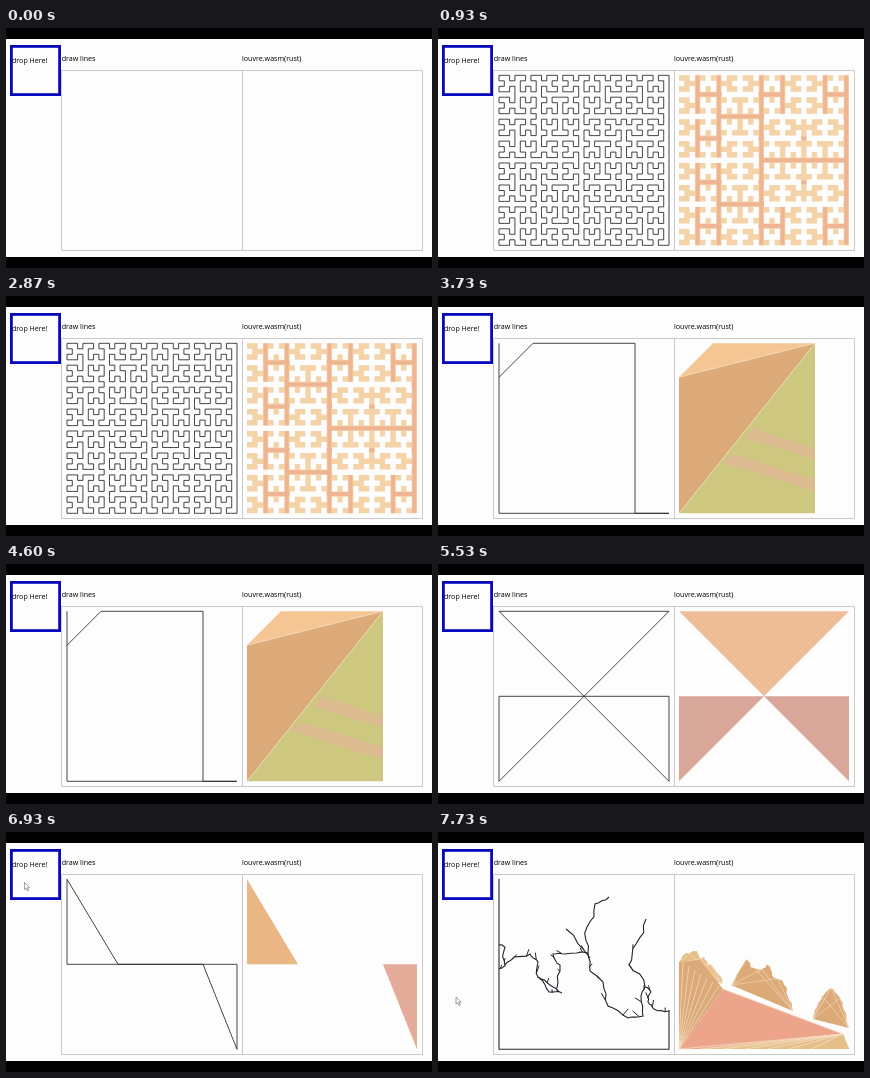
Animation, 426 px wide and 240 px high, one loop 7790 ms. Source, as an HTML page:

```html
<!DOCTYPE html>
<html lang="en">
<head>
<meta charset="utf-8">
<title>Polygon triangulation</title>
<style>
  html, body { margin: 0; width: 100%; height: 100%; overflow: hidden; background: #000; }
  svg { display: block; width: 100vw; height: 100vh; }
  text { font: 7.1px "Open Sans", "Noto Sans", sans-serif; fill: #000; }
</style>
</head>
<body>
<svg viewBox="0 0 426 240">
  <rect y="11" width="426" height="218" fill="#fdfdfd"/>
  <path d="M55.5 42.5H416.5V222.5H55.5ZM236.5 42.5V222.5" fill="none" stroke="#bdbdbb" stroke-width=".8"/>
  <rect x="5.4" y="18.4" width="48.2" height="48.2" fill="none" stroke="#0808bd" stroke-width="2.8"/>
  <text x="6" y="35">drop Here!</text>
  <text x="55.7" y="33">draw lines</text>
  <text x="236" y="33">louvre.wasm(rust)</text>
  <g id="scenes"></g>
  <path id="cursor" d="M0 0V7.2L1.7 5.7L2.9 8.4L4.1 7.9L2.9 5.3H5.1Z" fill="#fff" stroke="#777" stroke-width=".7"/>
</svg>
<script>
const LOOP = 7790;
const NS = "http://www.w3.org/2000/svg";
const LEFT = 61, RIGHT = 241, TOP = 47.3, SIZE = 170;
const SAND = "#e5bf88", SALMON = "#eca48a", TAN = "#dca978", PALE = "#f7dfc4";
const root = document.getElementById("scenes");
const cursor = document.getElementById("cursor");

function add(parent, tag, attrs) {
  const node = document.createElementNS(NS, tag);
  for (const key in attrs) node.setAttribute(key, attrs[key]);
  return parent.appendChild(node);
}

const parse = s => s.split(" ").map(p => p.split(",").map(Number));
const place = (points, left) => points.map(([x, y]) => [left + x * SIZE, TOP + y * SIZE]);
const unit = s => place(parse(s), RIGHT);
const join = points => points.map(p => p.map(v => v.toFixed(1)).join(",")).join(" ");

function line(g, points, stroke = "#24242c", width = .85) {
  return add(g, "polyline", { points: join(points), fill: "none", stroke, "stroke-width": width });
}

function fill(g, points, color) {
  return add(g, "polygon", { points: join(points), fill: color });
}

let seed = 7;
const random = () => (seed = (seed * 16807) % 2147483647) / 2147483647;

// Midpoint displacement turns a coarse line into a coast
function roughen(points, depth = 2) {
  if (!depth) return points;
  const out = [points[0]];
  for (let i = 1; i < points.length; i++) {
    const [ax, ay] = points[i - 1], [bx, by] = points[i];
    const k = (random() - .5) * .3;
    out.push([(ax + bx) / 2 - (by - ay) * k, (ay + by) / 2 + (bx - ax) * k], [bx, by]);
  }
  return roughen(out, depth - 1);
}

// Space-filling curve in grid steps, opening to the right
function hilbert(n) {
  return Array.from({ length: n * n }, (_, d) => {
    let x = 0, y = 0;
    for (let s = 1; s < n; s *= 2, d = Math.floor(d / 4)) {
      const rx = 1 & (d >> 1), ry = 1 & (d ^ rx);
      if (!ry) {
        if (rx) [x, y] = [s - 1 - x, s - 1 - y];
        [x, y] = [y, x];
      }
      x += s * rx;
      y += s * ry;
    }
    return [n - 1 - y, x];
  });
}

// Corridors of a curve cell that opens towards (dx, dy)
function corridors(cx, cy, half, dx, dy, depth) {
  if (!depth) return [];
  const bar = [[cx - dy * half, cy - dx * half], [cx + dy * half, cy + dx * half]];
  const exit = [[cx, cy], [cx + dx * half, cy + dy * half]];
  const out = [bar, exit], q = half / 2;
  for (const side of [-1, 1]) {
    const sx = dy * side, sy = dx * side;
    out.push(
      ...corridors(cx + (sx - dx) * q, cy + (sy - dy) * q, q, dx, dy, depth - 1),
      ...corridors(cx + (sx + dx) * q, cy + (sy + dy) * q, q, sx, sy, depth - 1));
  }
  return out;
}

function drawHilbert(g) {
  const n = 32, mid = (n - 1) / 2;
  const scale = points => points.map(([x, y]) => [x / n, y / (n - 1)]);
  const loop = [...hilbert(n), [n, n - 1], [n, 0], [n - 1, 0]];
  line(g, place(scale(loop), LEFT));

  const area = place(scale(loop), RIGHT);
  fill(g, area, "#f4d3a8");
  add(add(g, "clipPath", { id: "curve" }), "polygon", { points: join(area) });
  const inside = add(g, "g", { "clip-path": "url(#curve)" });
  const edge = [[n - .5, 0], [n - .5, n - 1]];
  for (const path of [edge, ...corridors(mid, mid, n / 2, 1, 0, 3)])
    line(inside, place(scale(path), RIGHT), "#efb593", 4);
}

function drawHouse(g) {
  line(g, place(parse("0,0 0,1 1,1 .8,1 .8,0 .2,0 0,.2"), LEFT));
  const [a, b, c, d, e] = unit("0,.2 .2,0 .8,0 .8,1 0,1");
  fill(g, [a, b, c], "#f5c694");
  fill(g, [a, c, e], TAN);
  fill(g, [c, d, e], "#cdc780");
  fill(g, unit(".44,.5 .8,.62 .8,.68 .39,.56"), "#dcbb91");
  fill(g, unit(".31,.65 .8,.8 .8,.87 .25,.7"), "#dcbb91");
  line(g, [a, c, e], "#f3dfbd", .7);
}

function drawBowtie(g) {
  line(g, place(parse("0,0 1,0 0,1 0,.5 1,.5 1,1 0,0"), LEFT));
  fill(g, unit("0,0 1,0 .5,.5"), "#efbd98");
  fill(g, unit("0,.5 .5,.5 0,1"), "#d9a69a");
  fill(g, unit("1,.5 .5,.5 1,1"), "#d9a69a");
}

function drawWedges(g) {
  line(g, place(parse("0,0 .3,.5 .8,.5 1,1 1,.5 0,.5 0,0"), LEFT));
  fill(g, unit("0,0 .3,.5 0,.5"), "#eab684");
  fill(g, unit("1,.5 .8,.5 1,1"), "#e2ac98");
}

// Jagged hill on the base from a to b, with pale seams fanning from one foot
function ridge(g, a, b, height, color) {
  const steps = 12, crest = [];
  for (let i = 0; i <= steps; i++) {
    const k = i / steps;
    const rise = height * Math.sin(Math.PI * k) ** .7 * (.6 + .4 * random());
    crest.push([a[0] + (b[0] - a[0]) * k, a[1] + (b[1] - a[1]) * k - rise]);
  }
  fill(g, roughen(crest), color);
  for (let i = 3; i < steps; i += 3) line(g, [a, crest[i], b], PALE, .6);
}

function drawCoast(g) {
  const ink = "#24242c";
  line(g, parse("61,47 61,217.3 231,217.3 231,178"), ink, 1.1);
  const shores = [
    "61,113 67,115 67,134 61,137",
    "67,133 76,125 92,122 100,130 100,145 112,153 124,161 111,160 101,146",
    "119,156 122,133 115,122 127,122 150,121 149,95 157,72 171,65",
    "128,97 152,126",
    "150,121 152,139 165,150 170,174 190,186 205,184 203,165 207,155 191,133 198,112 208,87",
    "207,155 213,160 210,170 216,177 231,179"
  ].map(s => roughen(parse(s)));

  for (const shore of shores) {
    line(g, shore, ink, 1.1);
    // Short inlets branch off every few points
    for (let i = 3; i < shore.length - 1; i += 4) {
      const [x, y] = shore[i], angle = -Math.PI * (.25 + .6 * random()), size = 3 + 6 * random();
      if (y > 115) line(g, [[x, y], [x + size * Math.cos(angle), y + size * Math.sin(angle)]], ink, 1);
    }
  }

  const corner = [RIGHT, 217], apex = [285, 157], cape = [405, 202];
  ridge(g, [241, 131], [284, 152], 22, SAND);
  fill(g, [corner, [241, 130], [262, 128], apex], TAN);
  fill(g, [corner, apex, cape, [411, 217]], SALMON);
  fill(g, [[262, 217], cape, [411, 217]], SAND);
  ridge(g, [293, 153], [355, 179], 42, TAN);
  ridge(g, [375, 187], [411, 196], 40, TAN);
  for (let i = 0; i < 7; i++) {
    line(g, [corner, [245 + i * 6, 130 + i * 4]], PALE, .7);
    line(g, [cape, [RIGHT + i * 22, 217]], PALE, .8);
  }
  line(g, [apex, cape], PALE, .9);
}

const scenes = [
  [670, drawHilbert],
  [2930, drawHouse],
  [4800, drawBowtie],
  [6600, drawWedges],
  [7500, drawCoast]
].map(([start, draw], i, all) => {
  const g = add(root, "g", {});
  draw(g);
  return { g, start, end: i + 1 < all.length ? all[i + 1][0] : LOOP };
});

// The pointer rests at a place, then darts away
const visits = [
  { start: 1930, end: 2070, from: [3, 105], to: [3, 105] },
  { start: 6600, end: 7200, from: [19, 49], to: [0, 100] },
  { start: 7600, end: LOOP, from: [18, 165], to: [18, 165] }
];
const during = t => span => t >= span.start && t < span.end;

function render(t) {
  const active = during(t);
  for (const scene of scenes) scene.g.setAttribute("display", active(scene) ? "inline" : "none");
  const visit = visits.find(active);
  cursor.setAttribute("display", visit ? "inline" : "none");
  if (!visit) return;
  const k = ((t - visit.start) / (visit.end - visit.start)) ** 6;
  const [x, y] = visit.from.map((v, i) => v + (visit.to[i] - v) * k);
  cursor.setAttribute("transform", `translate(${x} ${y})`);
}

const origin = performance.now();
function tick() {
  render((performance.now() - origin) % LOOP);
  requestAnimationFrame(tick);
}
tick();
</script>
</body>
</html>
```
